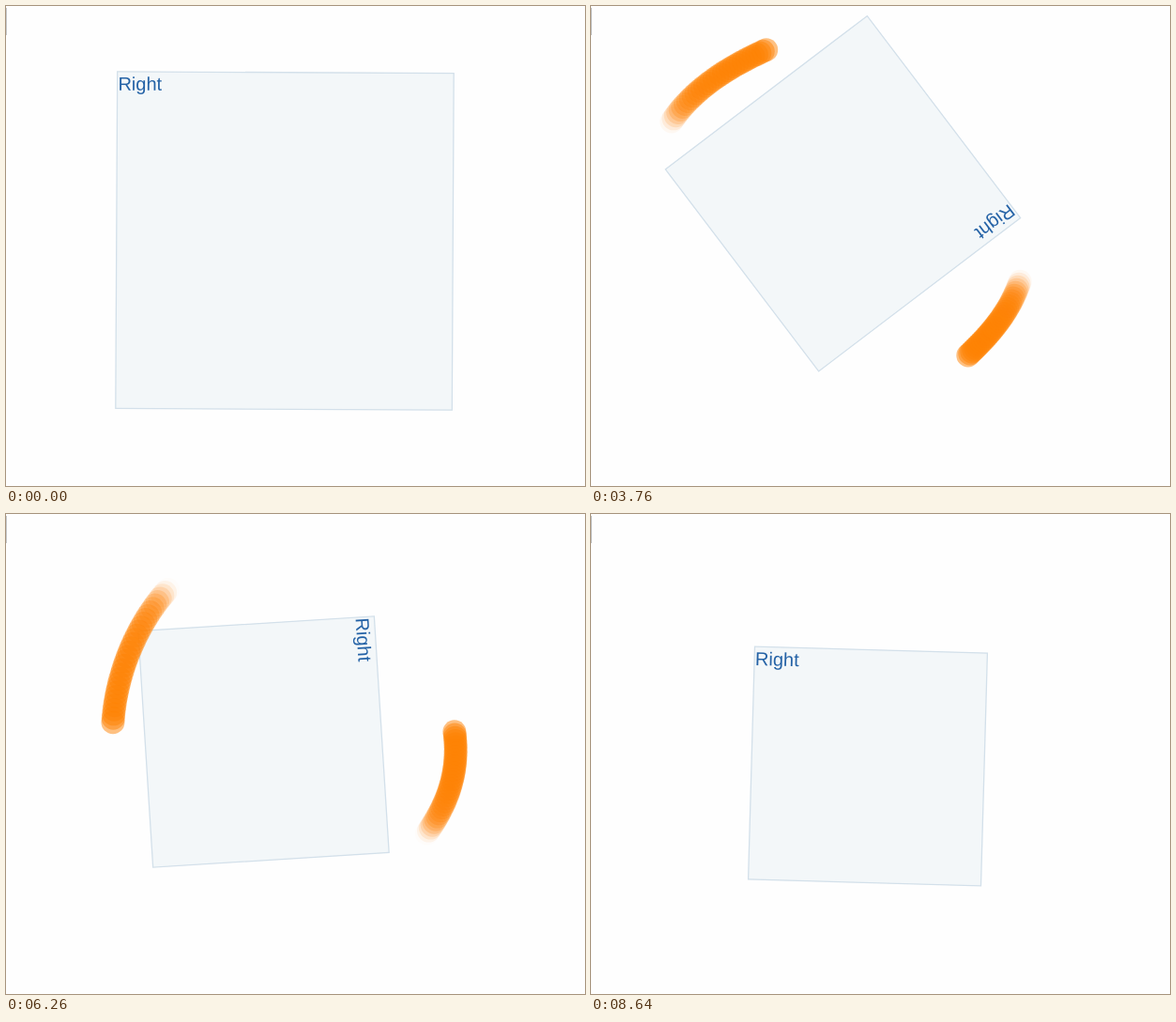
Write an HTML page that moves like this. It is 617x511 px and loops after 9 s.

```html
<!DOCTYPE html>
<html lang="en">
<head>
<meta charset="utf-8">
<title>Two-finger rotate and scale</title>
<style>
  html, body { margin: 0; width: 100%; height: 100%; overflow: hidden; background: #fefefe; }
  svg { display: block; width: 617px; height: 511px; }
  text { font: 20px "Liberation Sans", Arial, Helvetica, sans-serif; fill: #2462a6; }
  #box { fill: #f3f7f9; stroke: #d3e0ea; stroke-width: 1.3; }
  #trail { fill: #ff8205; }
</style>
</head>
<body>
<svg viewBox="0 0 617 511">
  <rect y="2" width="1" height="29" fill="#c4c6c8"/>
  <g id="card">
    <rect id="box"/>
    <text id="label">Right</text>
  </g>
  <g id="trail"></g>
</svg>
<script>
const LOOP = 9000, START = 1020, LIFT = 8100, END = 8640;
const LIFE = 540, GAP = 16, RADIUS = 12.5;

// time, centre x, centre y, angle, side
const poses = [
  [1020, 297, 250, 0.3, 358.5],
  [2067, 259.5, 266, 37, 302],
  [2567, 239, 247.5, 68.4, 285],
  [3271, 243.5, 213.5, 111.7, 282.5],
  [3771, 268.5, 199.7, 142.8, 270],
  [4161, 290.7, 197.8, 164.6, 275],
  [4661, 317, 204, 182.5, 290],
  [4810, 321, 205, 184.3, 292],
  [5760, 282.3, 208.8, 126, 261.5],
  [6260, 274.5, 242.5, 86.4, 252],
  [7071, 289, 285.5, 33.6, 244.5],
  [7571, 291.5, 275, 15.2, 243.5],
  [8100, 295, 268.5, 1.6, 248]
];

// the screen refreshes in even steps within each stretch
const stretches = [1020, 1940, 2880, 3830, 4780, 5720, 6680, 7630, 8580, END];
const counts = [15, 15, 16, 16, 16, 16, 16, 15, 1];

const $ = id => document.getElementById(id);

function set(el, attrs) {
  for (const key in attrs) el.setAttribute(key, attrs[key]);
}

function snap(t) {
  if (t < START || t >= END) return t;
  let i = 0;
  while (t >= stretches[i + 1]) i++;
  const from = stretches[i];
  const step = (stretches[i + 1] - from) / counts[i];
  return from + step * Math.min(Math.floor((t - from + 12) / step), counts[i] - 1);
}

function slope(i, c) {
  if (i === 0 || i === poses.length - 1) return 0;
  const [a, b, d] = poses.slice(i - 1, i + 2);
  const h0 = b[0] - a[0], h1 = d[0] - b[0];
  const s0 = (b[c] - a[c]) / h0, s1 = (d[c] - b[c]) / h1;
  return s0 * s1 <= 0 ? 0 : (s0 * h1 + s1 * h0) / (h0 + h1);
}

function poseAt(time) {
  const t = Math.min(Math.max(time, START), LIFT);
  let i = 0;
  while (i < poses.length - 2 && t >= poses[i + 1][0]) i++;
  const a = poses[i], b = poses[i + 1], h = b[0] - a[0];
  const u = (t - a[0]) / h, v = 1 - u;
  const mix = c =>
    v * v * (1 + 2 * u) * a[c] + u * u * (3 - 2 * u) * b[c] +
    h * u * v * (v * slope(i, c) - u * slope(i + 1, c));
  return { x: mix(1), y: mix(2), angle: mix(3), side: mix(4) };
}

// both fingers stay fixed to the card
function finger(pose, sign) {
  const rad = pose.angle * Math.PI / 180, tilt = -85.4 * Math.PI / 180;
  const lx = pose.side * (-0.056 + sign * 0.722 * Math.cos(tilt));
  const ly = pose.side * (-0.088 + sign * 0.722 * Math.sin(tilt));
  return {
    cx: pose.x + lx * Math.cos(rad) - ly * Math.sin(rad),
    cy: pose.y + lx * Math.sin(rad) + ly * Math.cos(rad)
  };
}

const dots = Array.from({ length: Math.ceil(LIFE / GAP) }, () => [1, -1].map(() => {
  const dot = document.createElementNS("http://www.w3.org/2000/svg", "circle");
  set(dot, { r: RADIUS });
  return $("trail").appendChild(dot);
}));

function draw(time) {
  const now = snap(time), pose = poseAt(now), half = pose.side / 2;
  set($("card"), { transform: `translate(${pose.x} ${pose.y}) rotate(${pose.angle})` });
  set($("box"), { x: -half, y: -half, width: pose.side, height: pose.side });
  set($("label"), { x: 0.8 - half, y: 19.8 - half });

  const latest = START + Math.floor((now - START) / GAP) * GAP;
  dots.forEach((pair, i) => {
    const born = latest - i * GAP, age = now - born;
    const on = born >= START && born <= LIFT && age < LIFE;
    const p = on && poseAt(born);
    pair.forEach((dot, k) => {
      if (!on) return set(dot, { opacity: 0 });
      set(dot, finger(p, k ? -1 : 1));
      set(dot, { opacity: 0.5 * (1 - (age / LIFE) ** 4) });
    });
  });
}

const begin = performance.now();
function frame() {
  draw((performance.now() - begin) % LOOP);
  requestAnimationFrame(frame);
}
frame();
</script>
</body>
</html>
```
